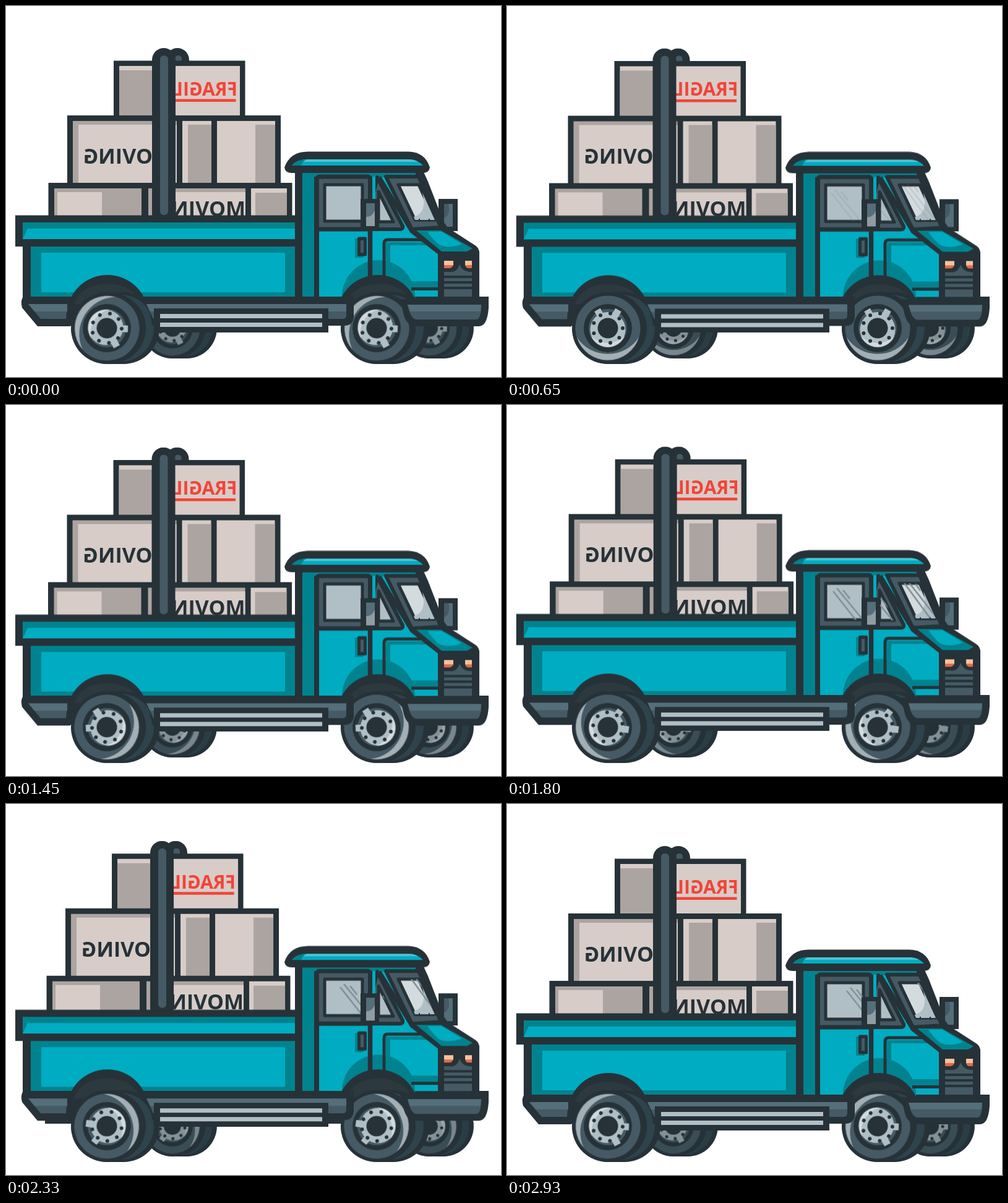
Write an HTML page without scripts that moves like this. It is 800 px wide and 600 px high and loops after 3.03 s.

```html
<!DOCTYPE html>
<html lang="en">
<head>
<meta charset="utf-8">
<title>Moving truck</title>
<style>
html, body { margin: 0; width: 100%; height: 100%; overflow: hidden; background: #fff; }
svg { display: block; width: 100vw; height: 100vh; }

.ink { fill: #263238; }
.slate { fill: #455a64; }
.steel { fill: #546e7a; }
.grey { fill: #b0bec5; }
.pale { fill: #d3dbdf; }
.teal { fill: #00acc1; }
.deep { fill: #00838f; }
.card { fill: #d7ccc8; }
.shade { fill: #aca4a1; }
.line { fill: none; stroke: #263238; stroke-linejoin: round; }
.edge { stroke: #263238; stroke-linejoin: round; }
text { font: 700 34px "Open Sans", "Noto Sans", sans-serif; fill: #263238; }
.red { fill: #f44336; }
text.red { font-size: 30px; }

.bob, .load, .spin, .shine { animation: 3.03s -4ms linear infinite; }
.bob { animation-name: bob; }
.load { animation-name: load; }
.spin { animation-name: spin; }
.shine { animation-name: shine; }

@keyframes bob {
  0%, 100% { transform: translateY(0); }
  3% { transform: translateY(-.6px); }
  9.2% { transform: translateY(-6px); }
  15.5% { transform: translateY(1.5px); }
  21.45% { transform: translateY(.4px); }
  29% { transform: translateY(-.4px); }
  36.3% { transform: translateY(2px); }
  42% { transform: translateY(0); }
  47.85% { transform: translateY(.4px); }
  59.4% { transform: translateY(-.7px); }
  66% { transform: translateY(1px); }
  73.9% { transform: translateY(-6px); }
  76.9% { transform: translateY(-6px); }
  83% { transform: translateY(1.5px); }
  90% { transform: translateY(-.3px); }
  96.7% { transform: translateY(0); }
}
@keyframes load {
  0%, 100% { transform: translate(0, 0); }
  3% { transform: translate(0, -1px); }
  9.2% { transform: translate(-3px, -9px); }
  15.5% { transform: translate(-1.5px, 1.5px); }
  21.45% { transform: translate(-.5px, .5px); }
  29% { transform: translate(.3px, -.4px); }
  36.3% { transform: translate(-2px, 2px); }
  42% { transform: translate(0, 0); }
  47.85% { transform: translate(-.5px, .5px); }
  59.4% { transform: translate(.7px, -.7px); }
  66% { transform: translate(-1px, 1px); }
  73.9% { transform: translate(-2.5px, -9px); }
  76.9% { transform: translate(-3px, -8.5px); }
  83% { transform: translate(-1.5px, 1.5px); }
  90% { transform: translate(.3px, -.3px); }
  96.7% { transform: translate(0, 0); }
}
/* three turns per loop, in hard steps */
@keyframes spin {
  0% { transform: rotate(122deg); animation-timing-function: steps(7); }
  21.45% { transform: rotate(360deg); animation-timing-function: steps(5); }
  36.3% { transform: rotate(535deg); animation-timing-function: steps(4); }
  47.85% { transform: rotate(657deg); animation-timing-function: steps(4); }
  59.4% { transform: rotate(787deg); animation-timing-function: steps(6); }
  76.9% { transform: rotate(968deg); animation-timing-function: steps(7); }
  96.7%, 100% { transform: rotate(1202deg); }
}
@keyframes shine {
  0%, 18.5% { opacity: 0; transform: translate(-4px, 0); }
  21.45% { opacity: .2; }
  30%, 39% { opacity: 1; transform: translate(0, 0); }
  45%, 49% { opacity: 0; transform: translate(0, 0); }
  56%, 59.4% { opacity: 1; transform: translate(0, 0); }
  76.9% { opacity: 1; transform: translate(13px, 0); }
  96.7%, 99.8% { opacity: .9; transform: translate(22px, 0); }
  100% { opacity: 0; transform: translate(22px, 0); }
}
</style>
</head>
<body>
<svg viewBox="0 0 800 600">
  <defs>
    <!-- wheel face, lit from below -->
    <g id="face">
      <circle class="slate" r="55" stroke="#263238" stroke-width="5"/>
      <path fill="#a3afb5" d="M-50 15A52.5 52.5 0 0 0 50 15A60 60 0 0 1-50 15Z"/>
      <circle class="ink" r="39"/>
      <circle class="slate" r="31"/>
      <circle class="grey" r="28.5" cy="2.5"/>
      <path class="pale" d="M-27 13A30 30 0 0 0 27 13A38 38 0 0 1-27 13Z"/>
      <g fill="none" stroke="#b0bec5" stroke-width="11">
        <path d="M0-22V-34" transform="rotate(30)"/>
        <path d="M0-22V-34" transform="rotate(-30)"/>
      </g>
      <circle r="24" fill="none" stroke="#263238" stroke-width="6" stroke-linecap="round" pathLength="9" stroke-dasharray="0 1"/>
      <circle class="ink" r="16.5"/>
    </g>
    <rect id="hull" class="ink" x="-58" y="-58" width="143" height="116" rx="58"/>
    <g id="tyre">
      <use href="#hull"/>
      <circle fill="#2e434b" cx="22" r="54"/>
      <circle class="ink" cx="6" r="57"/>
    </g>
    <path id="sideGlass" d="M515 289H576V348H515Z"/>
    <path id="quarterGlass" d="M602 300V349H626Z"/>
    <path id="frontGlass" d="M634 289H667L693 346H661Z"/>
    <clipPath id="glass">
      <use href="#sideGlass"/><use href="#quarterGlass"/><use href="#frontGlass"/>
    </clipPath>
  </defs>

  <!-- far side -->
  <rect class="ink" x="63" y="480" width="500" height="37"/>
  <g transform="translate(269 521) scale(.845)">
    <use href="#tyre"/>
    <g class="spin"><use href="#face"/></g>
    <use href="#hull" opacity=".32"/>
  </g>
  <g transform="translate(684 521) scale(.845)">
    <use href="#tyre"/>
    <g class="spin"><use href="#face"/></g>
    <use href="#hull" opacity=".32"/>
  </g>

  <!-- cargo -->
  <g class="load">
    <rect class="ink" x="258" y="68" width="38" height="100" rx="19"/>
    <rect class="slate" x="273" y="80" width="11" height="60" rx="5"/>
    <rect class="ink" x="174" y="88.500" width="212.500" height="100"/>
    <rect class="card" x="183" y="97" width="195" height="81"/>
    <rect class="shade" x="183" y="104" width="60" height="74"/>
    <text class="red" transform="translate(374 145) scale(-1 1)">FRAGILE</text>
    <rect class="red" x="268" y="150.500" width="103.500" height="4.500"/>

    <rect class="ink" x="99" y="177" width="345" height="118"/>
    <rect class="shade" x="108" y="186" width="168" height="101"/>
    <rect class="card" x="117" y="192" width="159" height="95"/>
    <text transform="translate(269 255) scale(-1 1)">MOVING</text>
    <rect class="card" x="285" y="186" width="47" height="101"/>
    <rect class="shade" x="294" y="192" width="38" height="95"/>
    <rect class="card" x="341" y="186" width="94" height="101"/>
    <rect class="shade" x="403" y="192" width="32" height="95"/>

    <rect class="ink" x="68.500" y="286" width="394" height="76"/>
    <rect class="shade" x="78" y="295" width="141" height="67"/>
    <rect class="card" x="83" y="301" width="72" height="61"/>
    <rect class="shade" x="230" y="295" width="157" height="67"/>
    <rect class="card" x="262" y="301" width="125" height="61"/>
    <text transform="translate(387 340) scale(-1 1)">MOVING</text>
    <rect class="card" x="396" y="295" width="58" height="67"/>
    <rect class="shade" x="403" y="302" width="51" height="60"/>

    <rect class="ink" x="236" y="68" width="38" height="290" rx="19"/>
    <rect class="slate" x="249" y="80" width="13" height="258" rx="6"/>
  </g>

  <!-- body behind the wheels -->
  <g class="bob">
    <rect class="ink" x="27" y="380" width="452" height="98"/>
    <rect class="deep" x="40" y="389" width="427" height="81"/>
    <rect class="teal" x="57" y="399" width="394" height="64"/>
    <rect class="ink" x="15" y="338.500" width="464" height="50.500"/>
    <rect class="deep" x="27" y="350" width="440" height="27"/>
    <path class="teal" d="M27 377L35 360H467V377Z"/>

    <path class="ink" d="M467 262H672L682 284L710 356L758 387Q765 391 765 400V478H467Z"/>
    <rect class="deep" x="479" y="270" width="19" height="200"/>
    <path class="teal" d="M506 270H660L655 362L700 398V470H506Z"/>
    <path class="deep" d="M498 270H662V277H498ZM614 382H676L682 387H621V440H614Z"/>
    <circle class="deep" cx="602" cy="470" r="59"/>
    <path class="deep" d="M655 445H700V456H655Z"/>
    <path class="line" stroke-width="7.500" d="M502 276V472M588.500 276V445"/>
    <path class="line" stroke-width="5" d="M611 440V384Q611 378 617 378H678M655 457.500H702"/>

    <rect class="slate edge" stroke-width="7" x="502.500" y="276" width="86" height="85" rx="4"/>
    <use href="#sideGlass" class="grey edge" stroke-width="5"/>
    <path class="slate edge" stroke-width="6" d="M600 277L641 356Q642 361 637 361H590V318Z"/>
    <path class="teal" d="M592 276H597V318H592Z"/>
    <use href="#quarterGlass" class="grey edge" stroke-width="5"/>
    <path class="slate edge" stroke-width="6" d="M614 276H667L703 358L656 361Z"/>
    <use href="#frontGlass" class="pale edge" stroke-width="5"/>
    <path class="grey" d="M673 302L693 346H661L659 341Q681 335 673 302Z"/>
    <path class="line" d="M603 277L656 364L702 400" stroke-width="7"/>
    <g clip-path="url(#glass)">
      <path class="shine" fill="none" stroke="#7f8d94" stroke-width="2.500" d="M527 302L565 350M533 297L575 348M543 300L554 314M596 316L624 350M604 314L636 350M640 286L684 346M648 286L692 342M660 290L668 301"/>
    </g>
    <path d="M659 347H694M668 344V349M684 344V349" fill="none" stroke="#263238" stroke-width="2"/>

    <path class="deep" d="M663 363H703L754 392L745 397H704Z"/>
    <path class="teal" d="M681 365H704L737 385Q715 393 700 386Q690 378 681 365Z"/>
    <rect class="deep" x="564" y="376" width="14" height="31"/>
    <rect class="ink" x="568" y="373.500" width="15" height="31" rx="2"/>
    <rect class="slate" x="573" y="379" width="5" height="20"/>

    <path class="ink" d="M573 312H603V362H573Z"/>
    <rect class="steel" x="582" y="319" width="14" height="37"/>
    <path fill="#8f9ca2" d="M582 341Q592 341 596 331V356H582Z"/>
    <path class="ink" d="M699 312H730V364H710L699 350Z"/>
    <path class="steel" d="M708 320H722V357H713L708 350Z"/>
    <path class="slate" d="M708 320H715Q719 338 708 343Z"/>

    <path class="ink" d="M698 397H765V478H698Z"/>
    <path class="slate" d="M708 405H753V470H708Z"/>
    <path class="ink" d="M703 405H733V418Q728 432 718 430H703ZM733 405H760V430H750Q738 430 733 418Z"/>
    <path fill="#f5c3a0" d="M708 412H723V419H708ZM742 412H753V419H742Z"/>
    <path fill="#e4694a" d="M708 419H723Q721 424 716 424H708ZM742 419H753V424H748Q743 424 742 419Z"/>
    <path stroke="#263238" stroke-width="4" d="M706 438H756M706 447H756M706 456H756"/>

    <path class="ink" d="M450 261Q459 235.500 488 235.500H650Q677 236 685 261Q684 270 673 270H462Q451 270 450 261Z"/>
    <path class="teal" d="M462 258Q470 248 486 248H650Q665 248 674 258Z"/>
    <path fill="#4dc4d4" d="M473 252Q479 248 486 248H650Q660 248 666 252Z"/>
    <path class="deep" d="M462 258Q470 248 486 248Q480 250 477 258Z"/>

    <path class="ink" d="M98 501A65 65 0 0 1 230 501V512H98ZM535 501A66 66 0 0 1 667 501V512H535Z"/>
    <path fill="#2c393f" d="M110 482Q120 451 163 449Q208 451 217 482ZM550 482Q560 451 602 449Q646 451 655 482Z"/>
  </g>

  <g transform="translate(163 521)">
    <use href="#tyre"/>
    <g class="spin"><use href="#face"/></g>
  </g>
  <g transform="translate(599 521)">
    <use href="#tyre"/>
    <g class="spin"><use href="#face"/></g>
  </g>

  <!-- skirts and bumper over the wheels -->
  <g class="bob">
    <path class="ink" d="M28 470H107Q100 488 106 497L104 518H51L26 488Q23 476 28 470Z"/>
    <path class="slate" d="M36 482H99L97 506H56Z"/>
    <path class="steel" d="M36 482H99V494H46Z"/>
    <path class="ink" d="M217 470H562V502Q561 517 547 517H236Q234 490 217 470Z"/>
    <path class="slate" d="M227 482H550V500Q550 506 544 506H238Z"/>
    <path class="steel" d="M227 482H550V494H233Z"/>
    <rect class="ink" x="239" y="489" width="282" height="39"/>
    <path class="grey" d="M249 498H511V505H249ZM249 512H511V519H249Z"/>

    <path class="ink" d="M637 474H764V470H780V488Q778 518 764 518H664Q648 518 643 500Z"/>
    <path class="slate" d="M649 483H768Q768 507 760 507H664Q654 507 649 483Z"/>
    <path class="steel" d="M649 483H768L767 494H653Z"/>
  </g>
</svg>
</body>
</html>
```
